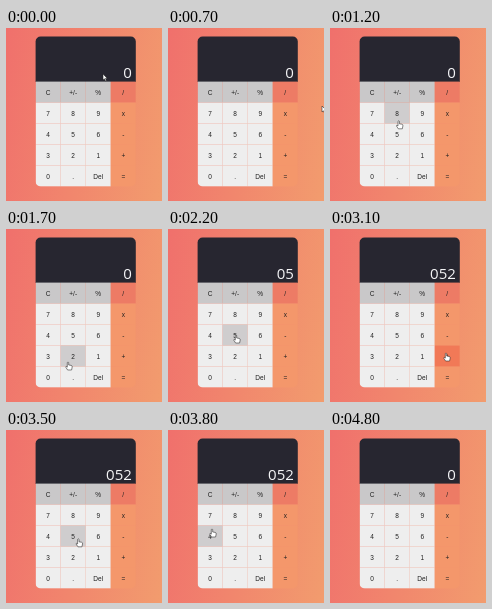
These frames come from a looping animation (156 by 173 pixels, 5.5 s). An HTML page:

```html
<!DOCTYPE html>
<html lang="en">
<head>
<meta charset="utf-8">
<title>Calculator</title>
<style>
  html, body { margin: 0; width: 100%; height: 100%; overflow: hidden; }
  body { background: linear-gradient(100deg, #f0706c, #f29c6e); }
  svg { display: block; width: 100vw; height: 100vh; }
  .key { fill: #eee; }
  .top { fill: #c9c8c9; }
  .op { fill: #f4976b; }
  .top.op { fill: #ed7b65; }
  .key.hover { fill: #cfcdce; }
  .top.hover { fill: #b9b8b9; }
  .op.hover { fill: #f17957; }
  .label { font: 6.5px "Liberation Sans", Arial, sans-serif; fill: #222; text-anchor: middle; }
  #value { font: 15px "Open Sans", sans-serif; fill: #f4f4f6; text-anchor: end; }
  #cursor path { fill: #fff; stroke: #222; stroke-width: .55; stroke-linejoin: round; }
</style>
</head>
<body>
<svg viewBox="0 0 156 173">
  <clipPath id="body"><rect x="29.6" y="8.5" width="100.2" height="150" rx="5"/></clipPath>
  <g clip-path="url(#body)">
    <rect x="29" y="8" width="102" height="46" fill="#272630"/>
    <g id="keys"></g>
  </g>
  <text id="value" x="125.8" y="50">0</text>
  <g id="cursor">
    <path id="arrow" d="M0 0V6L1.4 4.8 2.4 6.9 3.4 6.4 2.5 4.4H4.3Z"/>
    <path id="hand" d="M-.7 .5Q0-.5 .7 .5V3L3.2 3.4Q4.4 3.7 4.2 5L3.6 8H-.4L-2.2 5.2Q-2.3 4.2-1.4 4.5L-.7 5.1Z"/>
  </g>
</svg>
<script>
const LOOP = 5500, STEP = 100, HIDE_AT = 4800;
const LEFT = 29.6, TOP = 53.6, CELL_W = 25.05, CELL_H = 21;
const rows = ['C +/- % /', '7 8 9 x', '4 5 6 -', '3 2 1 +', '0 . Del ='].map(row => row.split(' '));

// Where the pointer arrives, and when
const stops = [
  { t: 0, x: 97, y: 46 },
  { t: 300, x: 108, y: 41 },
  { t: 700, x: 154, y: 78 },
  { t: 1000, x: 105, y: 112 },
  { t: 1450, x: 18, y: 66 },
  { t: 1700, x: 62, y: 133 },
  { t: 2200, x: 68, y: 106 },
  { t: 2450, x: 113, y: 123 },
  { t: 2700, x: 75, y: 123 },
  { t: 3100, x: 116, y: 124 },
  { t: 3800, x: 44, y: 99 },
  { t: 4000, x: 44, y: 66 },
  { t: 4600, x: 44, y: 66 },
  { t: 4700, x: 99, y: 70 }
];
const taps = [{ t: 2200, key: '5' }, { t: 2700, key: '2' }, { t: 4100, key: 'C' }];

const byId = id => document.getElementById(id);
const ease = k => k * k * (3 - 2 * k);
const mix = (a, b, k) => a + (b - a) * k;

function add(tag, attrs, text = '') {
  const node = document.createElementNS('http://www.w3.org/2000/svg', tag);
  for (const name in attrs) node.setAttribute(name, attrs[name]);
  node.textContent = text;
  byId('keys').append(node);
  return node;
}

const keys = rows.map((row, r) => row.map((label, c) => {
  const x = LEFT + c * CELL_W, y = TOP + r * CELL_H;
  const kind = 'key' + (r ? '' : ' top') + (c === 3 ? ' op' : '');
  const key = add('rect', { x, y, width: CELL_W, height: CELL_H, class: kind });
  add('text', { x: x + CELL_W / 2, y: y + 12.9, class: 'label' }, label);
  return key;
}));

function pointerAt(time) {
  const next = stops.findIndex(stop => stop.t > time);
  if (next < 0) return stops.at(-1);
  const a = stops[next - 1], b = stops[next];
  const k = ease((time - a.t) / (b.t - a.t));
  return { x: mix(a.x, b.x, k), y: mix(a.y, b.y, k) };
}

const readoutAt = time => taps
  .filter(tap => tap.t <= time)
  .reduce((text, { key }) => key === 'C' ? '0' : text + key, '0');

const show = (node, on) => node.setAttribute('visibility', on ? 'visible' : 'hidden');
let hovered;

function draw(now) {
  const time = Math.floor(now % LOOP / STEP) * STEP;
  const visible = time < HIDE_AT;
  const { x, y } = pointerAt(time);
  const row = keys[Math.floor((y - TOP) / CELL_H)];
  const key = visible ? row?.[Math.floor((x - LEFT) / CELL_W)] : undefined;

  hovered?.classList.remove('hover');
  key?.classList.add('hover');
  hovered = key;

  byId('value').textContent = readoutAt(time);
  byId('cursor').setAttribute('transform', `translate(${x} ${y})`);
  show(byId('arrow'), visible && !key);
  show(byId('hand'), visible && key);
  requestAnimationFrame(draw);
}
requestAnimationFrame(draw);
</script>
</body>
</html>
```
